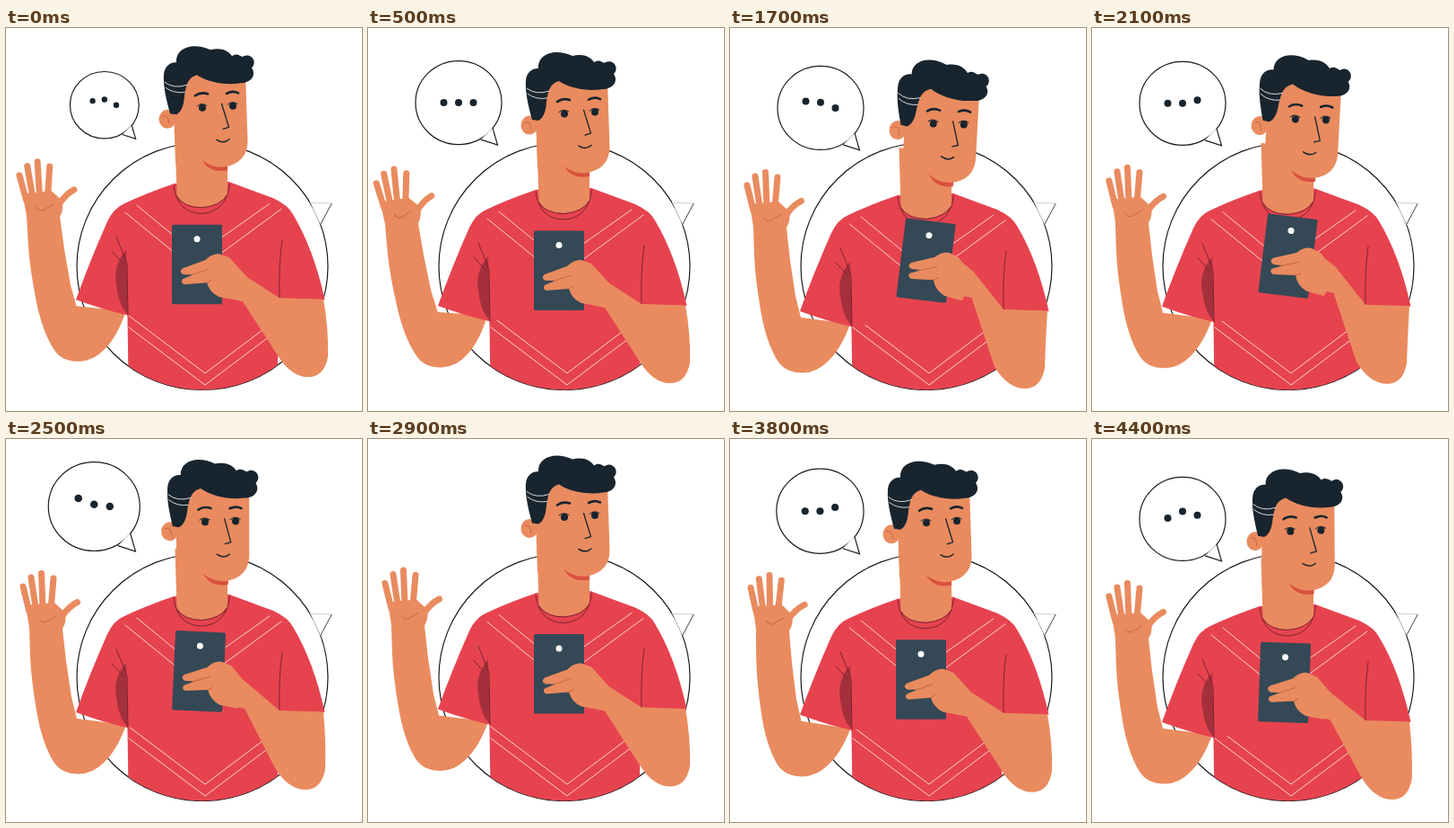
Animation of 397x426 px, one loop 4500 ms. Source, as an HTML page:

```html
<!DOCTYPE html>
<html lang="en">
<head>
<meta charset="utf-8">
<title>Waving man with phone</title>
<style>
html, body { margin: 0; width: 100%; height: 100%; overflow: hidden; background: #fff; }
svg { display: block; width: 397px; height: 426px; }
.line { fill: none; stroke-linecap: round; stroke-linejoin: round; }
.skin { fill: #e98b5f; }
.ink { fill: #18242e; }
.red { fill: #e6434f; }
.outline { stroke: #1b1b1b; stroke-width: 1.2; }
.crease { stroke: #c9663f; stroke-width: 1; }
.fold { stroke: #7c2330; stroke-width: 1; }
.trim { stroke: #fbd3d2; stroke-width: 1; }
</style>
</head>
<body>
<svg viewBox="0 0 397 426">
  <clipPath id="round"><ellipse cx="219" cy="265" rx="140" ry="137.5"/></clipPath>

  <ellipse class="line outline" cx="219" cy="265" rx="140" ry="137.5"/>
  <path fill="#fff" d="M339 193.500L364 194.500L351 219Z"/>
  <path class="line" stroke="#ccc" d="M339 194.500L363 195"/>
  <path class="line" stroke="#444" d="M363 195.500L351 218"/>

  <g id="bubble">
    <ellipse cx="101" cy="76" rx="48" ry="46.500" fill="#fff" class="outline" vector-effect="non-scaling-stroke"/>
    <path d="M126 117L144.500 123L139 104" fill="#fff" class="outline" vector-effect="non-scaling-stroke"/>
    <circle class="ink dot" cx="84.500" cy="76" r="4"/>
    <circle class="ink dot" cx="101" cy="76" r="4"/>
    <circle class="ink dot" cx="117.500" cy="76" r="4"/>
  </g>

  <g id="wave">
    <path class="skin" d="M22 183L54 180L66 191Q68 201 63 209L67 245L73 285L79 309L134 316Q124 344 109 358Q97 370 82 370.500Q62 371 53 357Q40 336 34 300Q28 265 27 240L26 208Q24 195 22 183Z"/>
    <g class="line" stroke="#e98b5f" stroke-width="7">
      <path d="M19 162L26 190M28 152L33 185M39.500 147.500L41 185M53 153L50 187"/>
      <path d="M79.500 179.500Q70 184 61 197"/>
    </g>
    <path class="line crease" d="M37 198Q42 205 47 200L56 195"/>
  </g>

  <g clip-path="url(#round)">
    <g class="bob"><path class="red" d="M135 290L137 420H302L305 290Z"/></g>
    <path class="line trim" d="M137 320L222 384L302 324M137 333L222 397L302 337"/>
  </g>
  <g class="bob">
    <path class="red" d="M187 173Q155 184 132 195Q120 200 113 215Q93 260 78 302Q108 313 135 319L305 301L355.500 302Q343 245 320 207Q315 197 298 189L249 171Z"/>
    <path fill="#a5303d" d="M134 247Q119 264 123 285Q126 310 136 318Z"/>
    <path class="line fold" d="M118 248L132 263M123 232Q130 248 135 262L136 319M308 235Q304 262 305 300"/>
    <path class="line trim" d="M133 205L213 270L307 201M146 197L213 252L294 195"/>
    <path class="red" d="M187 173Q190 207 219 206Q246 204 250 171Z"/>
    <path class="line fold" d="M187 175Q191 206 219 206Q246 204 249.500 173"/>
    <path class="skin" d="M188.500 120L190.500 186Q198 199 219 199Q240 197 247 184L247 130Z"/>
    <path class="line fold" d="M190.500 187Q198 199.500 219 199.500Q240 197.500 247 185"/>
  </g>

  <g id="head">
    <ellipse class="skin" cx="180" cy="101" rx="9.500" ry="10.500"/>
    <path class="line crease" d="M175 98Q181 95 182 106"/>
    <path fill="#d9513f" d="M218 145L247 148V158Q226 162 218 145Z"/>
    <path class="skin" d="M186 62L189 150Q205 146 219 147Q231 156 245 154Q269 149 269.500 126L267 50H195Z"/>
    <path class="ink" d="M183 95C179 80 175 65 176 51C177 41 185 37 190 38C189 22 208 15 228 24C240 21 248 25 252 31C259 26 263 34 265 31C273 27 281 37 274 44C280 53 272 61 262 61C245 64 225 60 213 52C203 55 201 62 199 75Q198 92 190 96Z"/>
    <path class="line" stroke="#e8ecee" stroke-width=".9" d="M177 60Q187 68 202 63M178 66Q187 73 199.500 71"/>
    <g id="face">
      <path class="line" stroke="#18242e" stroke-width="2.600" d="M211 75Q217 70.500 225 73M246 72.500Q253 69 259 72"/>
      <circle class="ink" cx="219" cy="88.500" r="4"/>
      <circle class="ink" cx="253" cy="86.500" r="4"/>
      <path class="line" stroke="#18242e" d="M213 86.500Q218 82 224 86M247 85Q252 80 258 84"/>
      <path class="line" stroke="#18242e" stroke-width="1.300" d="M240.500 84L248.500 110L242 112"/>
      <path id="mouth" class="line" stroke="#18242e" stroke-width="1.500" d="M235 124Q243 129 249 123.500"/>
    </g>
  </g>

  <g class="bob"><path id="arm" class="skin"/></g>
  <g id="phone">
    <rect x="185" y="218.500" width="56" height="88.500" rx="1.500" fill="#344955"/>
    <circle cx="213" cy="234.500" r="3.500" fill="#fff"/>
    <path class="skin" d="M197 267L222 258Q230 250 238 251L249 255L270 278L258 302L238 299Q227 294 224 283L199 285Q194 283 197 279L209 274L198 274Q192 271 197 267Z"/>
    <path class="line crease" d="M207 274.500L226 268M224 283L229 280"/>
  </g>
</svg>

<script>
const LOOP = 4500, STEP = 100, CYCLE = 3450, LEAD = 450, DOT_CYCLE = 870;
const $ = id => document.getElementById(id);
const move = (el, value) => el.setAttribute("transform", value);
const bobbing = document.querySelectorAll(".bob");
const dots = document.querySelectorAll(".dot");

const smooth = (from, to, p) => {
  const x = Math.min(1, Math.max(0, (p - from) / (to - from)));
  return x * x * (3 - 2 * x);
};

// Eased value through [time, value] pairs
const along = (keys, p) => keys.reduce((value, [time, next], i) =>
  i ? value + (next - value) * smooth(keys[i - 1][0], time, p) : next, 0);

const popKeys = [[-450, 0], [-230, 1.24], [0, .8], [200, 1.08], [400, 1], [2420, 1], [2600, 1.15], [2800, 0]];
const waveKeys = [[-150, 0], [0, -1.4], [150, -2.6], [350, 1.4], [530, -3.7], [750, 0]];

const hop = (p, peak) => {
  const d = ((p - peak) % DOT_CYCLE + DOT_CYCLE * 1.5) % DOT_CYCLE - DOT_CYCLE / 2;
  return Math.abs(d) < 200 ? 8.5 * Math.cos(d / 400 * Math.PI) : 0;
};

function draw(t) {
  const p = (t + LEAD) % CYCLE - LEAD;
  const bob = 6.5 - 8.3 * Math.cos((p + 400) / CYCLE * 2 * Math.PI);
  const lift = smooth(600, 1600, p) - smooth(2150, 2750, p);

  bobbing.forEach(el => move(el, `translate(0 ${bob})`));
  move($("head"), `translate(0 ${bob + 3 * lift}) rotate(${5 * lift} 222 180)`);
  move($("face"), `translate(0 ${2 * lift})`);
  move($("mouth"), `translate(${-4 * lift} 0)`);
  move($("wave"), `translate(0 ${bob}) rotate(${along(waveKeys, p)} 78 330)`);
  move($("phone"), `translate(${5.5 * lift} ${bob - 17 * lift}) rotate(${7 * lift} 213 263)`);

  const hand = (x, y) => `${x + 5.5 * lift} ${y - 17 * lift}`;
  const elbow = (x, y) => `${x - 8 * lift} ${y}`;
  $("arm").setAttribute("d", `M${hand(240, 299)}L${hand(250, 262)}L${hand(266, 275)}L305 300L354 301.5
    Q${elbow(360, 335)} ${elbow(359, 365)}Q${elbow(355, 388)} ${elbow(337, 388)}
    Q${elbow(318, 388)} ${elbow(303, 364)}L${hand(264, 304)}Z`);

  move($("bubble"), `translate(145 ${123 + bob}) scale(${along(popKeys, p)}) translate(-145 -123)`);
  dots.forEach((dot, i) => dot.setAttribute("cy", 76 - hop(p, -105 + 160 * i)));
}

const start = performance.now();
function tick() {
  const t = (performance.now() - start) % LOOP;
  draw(Math.floor(t / STEP) * STEP);
  requestAnimationFrame(tick);
}
tick();
</script>
</body>
</html>
```
